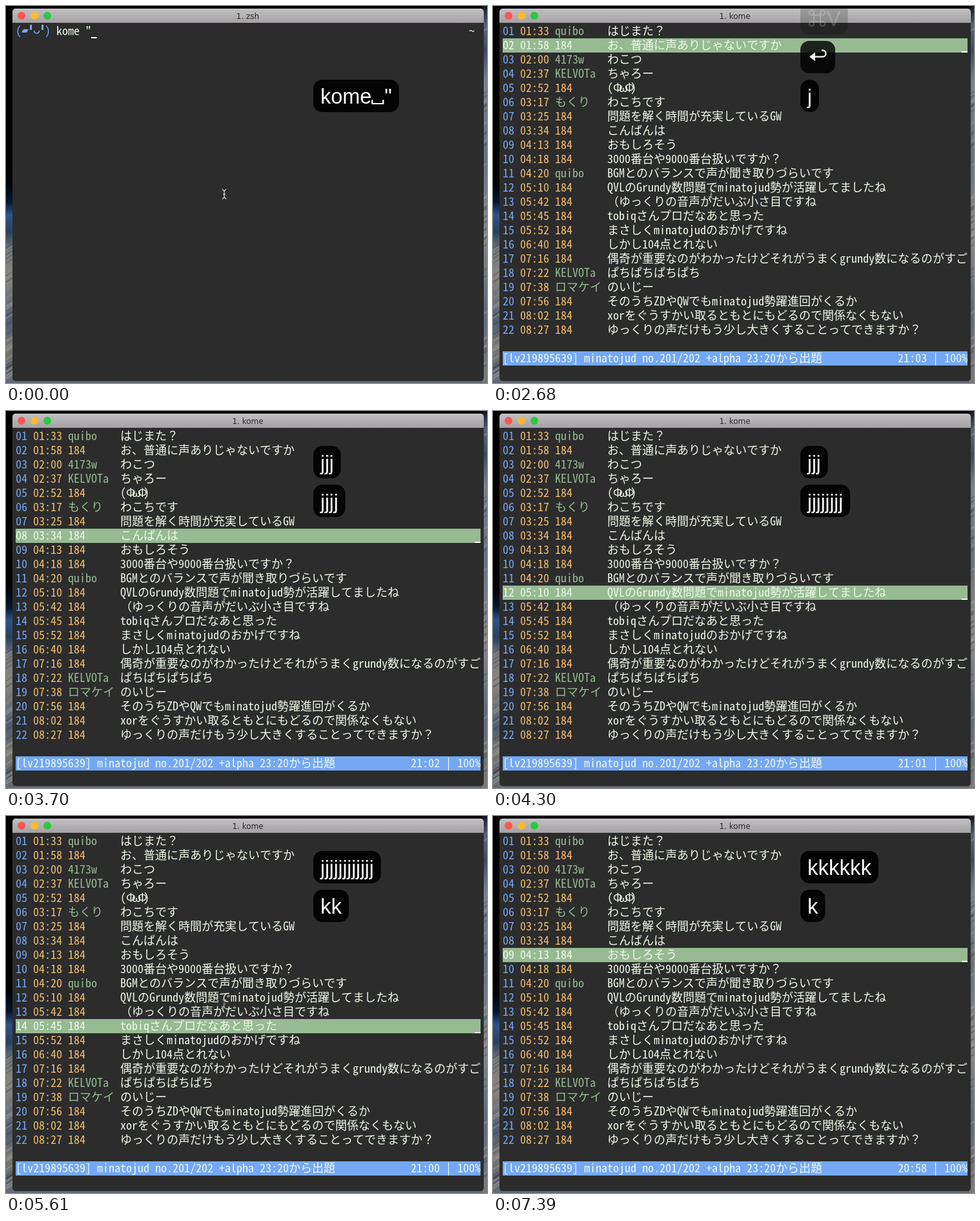
Recreate the animation shown at these times as an HTML page with a canvas. Size 745 by 583 pixels, loop 8000 ms.

```html
<!DOCTYPE html>
<html lang="ja">
<head>
<meta charset="utf-8">
<title>Terminal comment viewer</title>
<style>
html, body { margin: 0; width: 100%; height: 100%; overflow: hidden; background: #000; }
canvas { display: block; }
</style>
</head>
<body>
<canvas id="stage" width="745" height="583"></canvas>
<script>
const ctx = document.getElementById('stage').getContext('2d');
const LOOP = 8000, CELL = 9, LEFT = 15, ROW = 22, TOP = 28;
const MONO = '500 18px "Noto Sans Mono CJK JP", "Noto Sans CJK JP", "Noto Sans Mono", monospace';
const BLUE = '#74a8f4', YELLOW = '#efbd6e', GREEN = '#97ba93', CREAM = '#eef8e8';

const comments = `01:33|quibo|はじまた？
01:58|184|お、普通に声ありじゃないですか
02:00|4173w|わこつ
02:37|KELVOTa|ちゃろー
02:52|184|(ФωФ)
03:17|もくり|わこちです
03:25|184|問題を解く時間が充実しているGW
03:34|184|こんばんは
04:13|184|おもしろそう
04:18|184|3000番台や9000番台扱いですか？
04:20|quibo|BGMとのバランスで声が聞き取りづらいです
05:10|184|QVLのGrundy数問題でminatojud勢が活躍してましたね
05:42|184|（ゆっくりの音声がだいぶ小さ目ですね
05:45|184|tobiqさんプロだなあと思った
05:52|184|まさしくminatojudのおかげですね
06:40|184|しかし104点とれない
07:16|184|偶奇が重要なのがわかったけどそれがうまくgrundy数になるのがすご
07:22|KELVOTa|ぱちぱちぱちぱち
07:38|ロマケイ|のいじー
07:56|184|そのうちZDやQWでもminatojud勢躍進回がくるか
08:02|184|xorをぐうすかい取るともとにもどるので関係なくもない
08:27|184|ゆっくりの声だけもう少し大きくすることってできますか？`
  .split('\n').map(line => line.split('|'));

const url = 'http://live.nicovideo.jp/watch/lv219895639?ref=zero_mynicorepo';
const j = n => 'j'.repeat(n), k = n => 'k'.repeat(n);
const cmd = 'kome␣""⇠', paste = '⌘V', enter = '↩';

// time, selected row (0 = shell), key bubbles from the bottom up as label or [label, alpha]
const steps = [
  [0, 0, 'kome␣"'], [150, 0, 'kome␣""'], [300, 0, cmd], [450, 0, cmd],
  [600, 0, paste, cmd], [750, 0, paste, cmd],
  [1040, 0, enter, paste, [cmd, .95]], [1190, 0, enter, paste, [cmd, .85]],
  [1490, 1, enter, paste, [cmd, .85]],
  [2230, 1, enter, paste, [cmd, .4]], [2380, 1, enter, [paste, .8]],
  [2530, 1, j(1), enter, [paste, .4]], [2680, 2, j(1), [enter, .9], [paste, .2]],
  [2820, 3, j(2), [enter, .7]], [2970, 4, j(3), [enter, .4]], [3110, 4, j(3)],
  [3260, 5, j(1), j(3)], [3400, 6, j(2), j(3)], [3550, 7, j(3), j(3)], [3700, 8, j(4), j(3)],
  [3850, 9, j(5), j(3)], [4000, 10, j(6), j(3)], [4150, 11, j(7), j(3)], [4290, 12, j(8), j(3)],
  [4440, 13, j(9), j(3)], [4590, 14, j(10), j(3)], [4740, 15, j(11), j(3)], [4880, 15, j(12), j(3)],
  [5030, 16, j(12), [j(3), .6]], [5170, 16, j(12), [j(3), .25]], [5320, 16, j(12)],
  [5460, 15, k(1), j(12)], [5610, 14, k(2), j(12)], [5760, 13, k(3), j(12)],
  [5910, 12, k(4), j(12)], [6050, 11, k(5), j(12)], [6200, 10, k(6), j(12)],
  [6800, 10, k(1), k(6), [j(12), .5]], [6950, 9, k(1), k(6), [j(12), .2]],
  [7100, 9, k(1), k(6)], [7390, 9, k(1), k(6)]
];
const ticks = [2230, 3260, 4290, 5320, 6200, 7390];

function rect(x, y, w, h, color) {
  ctx.fillStyle = color;
  ctx.fillRect(x, y, w, h);
}

function rounded(x, y, w, h, r, color) {
  ctx.fillStyle = color;
  ctx.beginPath();
  ctx.roundRect(x, y, w, h, r);
  ctx.fill();
}

function gradient(x, y, stops) {
  const g = ctx.createLinearGradient(0, 0, x, y);
  stops.forEach(([at, color]) => g.addColorStop(at, color));
  return g;
}

function trace(points) {
  ctx.beginPath();
  points.forEach(([x, y]) => ctx.lineTo(x, y));
}

function line(points, width = 2.2) {
  ctx.lineWidth = width;
  trace(points);
  ctx.stroke();
}

function polygon(points) {
  trace(points);
  ctx.fill();
}

const curve = (x, y, r, from = 0, to = 2 * Math.PI) => ctx.ellipse(x, y, r, r, 0, from, to);

// Terminal text: one cell for narrow characters, two for East Asian ones.
function cells(text, x, row, color) {
  ctx.font = MONO;
  ctx.fillStyle = color;
  const y = TOP + ROW * row + 17;
  for (const ch of text) {
    ctx.fillText(ch, x, y);
    x += ch.charCodeAt(0) < 0x2000 ? CELL : 2 * CELL;
  }
}

const cursor = (x, row) => rect(x, TOP + ROW * row + 20, CELL, 2, '#fff');

function drawDesktop() {
  rect(0, 0, 745, 583, gradient(0, 583, [
    [0, '#000'], [.47, '#010205'], [.52, '#061730'], [.555, '#2c5488'],
    [.6, '#28405f'], [.65, '#77797a'], [.72, '#8b8781'], [.84, '#505d70'], [.9, '#77756f'], [1, '#626974']
  ]));
  rect(738, 0, 7, 583, gradient(0, 583, [
    [0, '#10151f'], [.05, '#54657d'], [.12, '#3b4d69'], [.2, '#7b828b'], [.4, '#68717f'],
    [.6, '#8a8a88'], [.8, '#636b78'], [1, '#7a7a78']
  ]));
  let seed = 7;
  const random = () => (seed = seed * 16807 % 2147483647) / 2147483647;
  for (let i = 0; i < 70; i++) {
    const right = i % 2, x = right ? 738 : 0, y = right ? 20 + random() * 560 : 370 + random() * 210;
    ctx.strokeStyle = random() < .5 ? 'rgba(185,180,172,.35)' : 'rgba(50,58,72,.35)';
    line([[x, y + 5], [x + 12, y - 3]], 1 + random() * 2);
  }
}

function drawWindow(title) {
  rounded(10, 4, 730, 576, 5, '#2c2c2c');
  rounded(10, 4, 730, 22, [5, 5, 0, 0], gradient(0, 26, [[.15, '#c3c0c3'], [1, '#a5a2a5']]));
  ['#fc5652', '#fdb92f', '#2bc840'].forEach((color, i) => rounded(18 + 20 * i, 9, 12, 12, 6, color));
  ctx.font = '12px "DejaVu Sans", sans-serif';
  ctx.textAlign = 'center';
  ctx.fillStyle = '#2b292b';
  ctx.fillText(title, 374.5, 20);
  ctx.textAlign = 'left';
}

function drawShell(t) {
  cells('(', 15, 0, BLUE);
  cells(')', 60, 0, BLUE);
  polygon([[27, 36], [35, 36], [32, 41], [24, 41]]);
  rect(37, 29, 3, 8, BLUE);
  rect(55, 29, 3, 8, BLUE);
  ctx.strokeStyle = BLUE;
  ctx.lineWidth = 1.6;
  ctx.beginPath();
  curve(47.5, 38, 4, 0, Math.PI);
  ctx.stroke();

  const typed = t < 150 ? '"' : t < 750 ? '""' : `"${url}"`;
  cells('kome ' + typed, 78, 0, CREAM);
  cells('~', 717, 0, CREAM);
  if (t >= 1190) cursor(LEFT, 1);
  else cursor(t < 150 ? 132 : t < 450 ? 141 : t < 750 ? 132 : 690, 0);
}

function drawComments(selected, t) {
  comments.forEach(([time, name, text], i) => {
    const active = i + 1 === selected, tint = color => active ? CREAM : color;
    if (active) rect(LEFT, TOP + ROW * i, 720, ROW, GREEN);
    cells(String(i + 1).padStart(2, '0'), LEFT, i, tint(BLUE));
    cells(time, 42, i, tint(YELLOW));
    cells(name, 96, i, tint(name === '184' ? YELLOW : GREEN));
    cells(text, 177, i, CREAM);
    if (active) cursor(726, i);
  });
  const left = 21 * 60 + 4 - ticks.filter(at => at <= t).length;
  const clock = `${Math.floor(left / 60)}:${String(left % 60).padStart(2, '0')}`;
  rect(LEFT, TOP + ROW * 23, 720, ROW, BLUE);
  cells('[lv219895639] minatojud no.201/202 +alpha 23:20から出題', LEFT, 23, CREAM);
  cells(`${clock} | 100%`, 627, 23, CREAM);
}

function drawPointer(dim) {
  ctx.strokeStyle = dim ? 'rgba(205,205,205,.6)' : '#ddd';
  line([[335, 283.5], [338, 286], [341, 283.5]], 1.2);
  line([[338, 286], [338, 296]], 1.2);
  line([[335, 298.5], [338, 296], [341, 298.5]], 1.2);
  line([[336, 291], [340, 291]], 1.2);
}

// Key symbols: advance width and drawing, relative to pen x and bubble top.
const icons = {
  '␣': [20, () => line([[1, 31], [1, 37], [18, 37], [18, 31]])],
  '⇠': [36, () => {
    polygon([[7, 25], [14, 20], [14, 30]]);
    for (let x = 14; x < 32; x += 5) rect(x, 24, 3.5, 2.4, '#fff');
  }],
  '⌘': [30, () => {
    ctx.lineWidth = 2.2;
    ctx.strokeRect(10, 20, 10, 10);
    for (const sx of [-1, 1]) for (const sy of [-1, 1]) {
      ctx.beginPath();
      curve(15 + sx * 8.5, 25 + sy * 8.5, 3.6);
      ctx.stroke();
    }
  }],
  '↩': [32, () => {
    ctx.lineWidth = 2.4;
    ctx.beginPath();
    ctx.moveTo(22, 14.5);
    curve(23.5, 19.5, 5, -Math.PI / 2, Math.PI / 2);
    ctx.lineTo(6, 24.5);
    ctx.stroke();
    polygon([[3, 24.5], [12, 17.5], [12, 31.5]]);
  }]
};

function drawBubble(entry, y) {
  const [label, alpha] = Array.isArray(entry) ? entry : [entry, 1];
  const size = label[0] === 'j' ? 31 : /^k+$/.test(label) ? 33 : 32.4;
  ctx.font = `${size}px "Liberation Sans", Arial, sans-serif`;
  const parts = label.split(/([␣⇠⌘↩])/).filter(Boolean);
  const width = part => icons[part] ? icons[part][0] : ctx.measureText(part).width;
  const total = parts.reduce((sum, part) => sum + width(part), 22);
  ctx.save();
  ctx.globalAlpha = alpha;
  ctx.translate(476, y);
  rounded(0, 0, total, 50, 14, 'rgba(0,0,0,.9)');
  ctx.translate(11, 0);
  ctx.strokeStyle = '#fff';
  for (const part of parts) {
    ctx.fillStyle = '#fff';
    if (icons[part]) icons[part][1]();
    else ctx.fillText(part, 0, 37);
    ctx.translate(width(part), 0);
  }
  ctx.restore();
}

function draw([t, selected, ...bubbles]) {
  drawDesktop();
  drawWindow(t < 2230 ? '1. zsh' : '1. kome');
  if (selected) drawComments(selected, t);
  else drawShell(t);
  drawPointer(selected > 0);
  bubbles.forEach((entry, i) => drawBubble(entry, 114 - 60 * i));
}

const start = performance.now();
let shown;
function frame() {
  const t = (performance.now() - start) % LOOP;
  const step = steps.findLast(([at]) => at <= t);
  if (step !== shown) draw(shown = step);
  requestAnimationFrame(frame);
}
frame();
</script>
</body>
</html>
```
